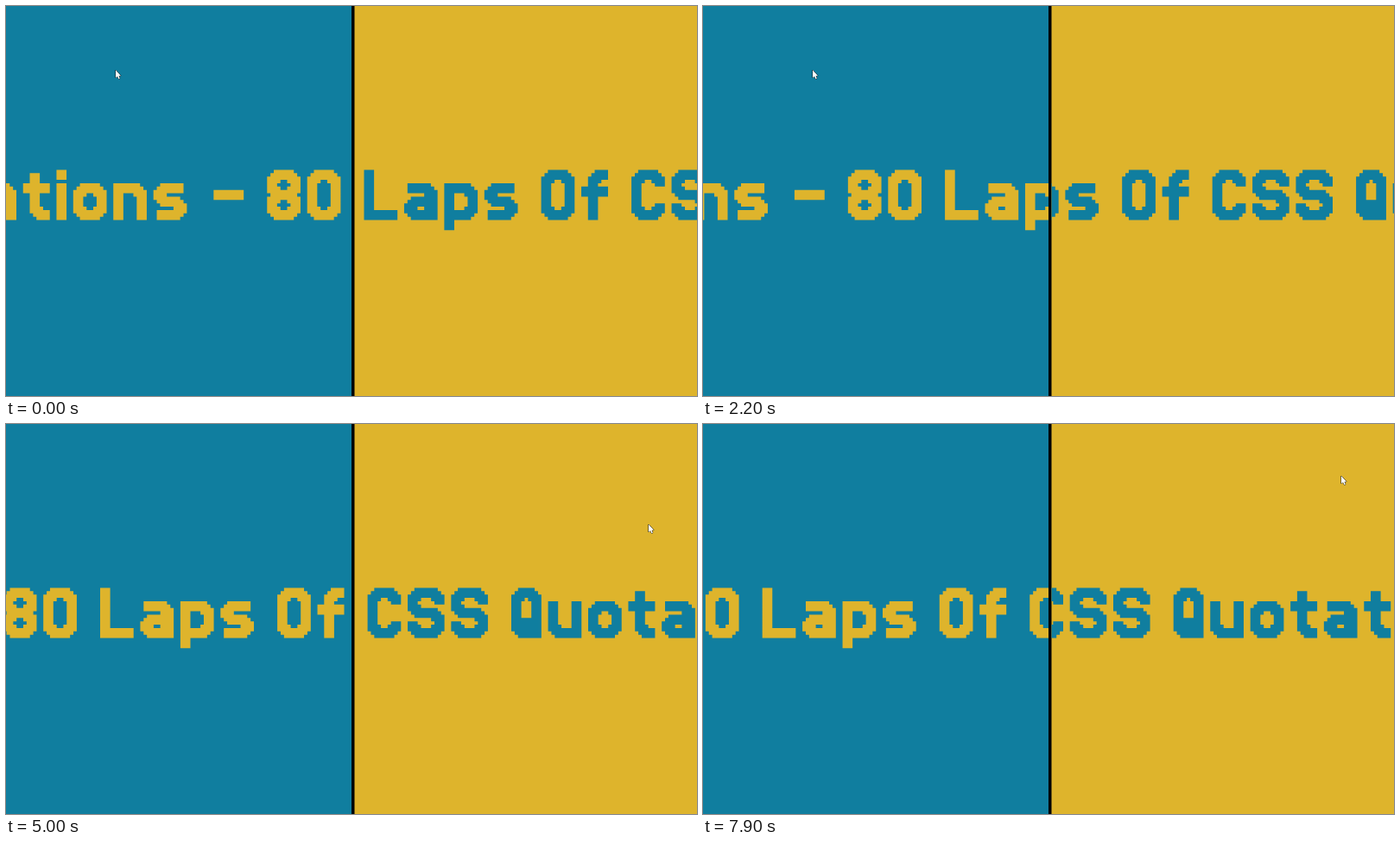
These frames come from a looping animation (800x451 px, 8000 ms). An HTML page with a canvas:

```html
<!DOCTYPE html>
<html lang="en">
<head>
<meta charset="utf-8">
<title>80 Laps Of CSS Quotations</title>
<style>
  html, body { margin: 0; width: 100%; height: 100%; overflow: hidden; background: #000; }
  canvas { display: block; width: 100vw; height: 100vh; }
</style>
</head>
<body>
<canvas id="stage" width="800" height="451" role="img" aria-label="80 Laps Of CSS Quotations"></canvas>
<script>
const ctx = document.getElementById('stage').getContext('2d');
const TEAL = '#107e9f', GOLD = '#deb42c';
const W = 800, H = 451, LOOP = 8000, STEP = 100;
const CELL = 3.87, CAP_Y = 189.5;

// Guide lines of the pixel letters, at the centre of a 3x3 pen.
const CAP = 1, XH = 5, MID = 7, BASE = 13, DESC = 16;
const L = 1, R = 8, CUT = 2, GAP = 2, SPACE = 5;

// Strokes are lists of [x0, y0, x1, y1].
const slant = (x0, y0, x1, y1) => [[x0, y0, x1, y1]];
const stem = (x, y0, y1) => slant(x, y0, x, y1);
const bar = (y, x0, x1) => slant(x0, y, x1, y);

// Bar with both ends bent: down for dir 1, up for dir -1.
const cup = (y, dir, right = R) => [
  ...slant(L, y + CUT * dir, L + CUT, y),
  ...bar(y, L + CUT, right - CUT),
  ...slant(right - CUT, y, right, y + CUT * dir)
];
const ring = (top, base, right = R) => [
  ...cup(top, 1, right), ...cup(base, -1, right),
  ...stem(L, top + CUT, base - CUT), ...stem(right, top + CUT, base - CUT)
];
// Top bar that turns down into the right side.
const shoulder = (from, end) => [
  ...bar(XH, from, R - CUT), ...slant(R - CUT, XH, R, XH + CUT), ...stem(R, XH + CUT, end)
];
// Middle of an S.
const spine = (top, right) => {
  const mid = (top + BASE) / 2;
  return [
    ...stem(L, top + CUT, mid - CUT), ...slant(L, mid - CUT, L + CUT, mid),
    ...bar(mid, L + CUT, right - CUT), ...slant(right - CUT, mid, right, mid + CUT),
    ...stem(right, mid + CUT, BASE - CUT)
  ];
};

const oval = ring(CAP, BASE);
const GLYPHS = {
  O: oval,
  0: oval,
  8: [...ring(CAP, MID), ...ring(MID, BASE)],
  Q: [...ring(CAP, BASE, R - 1), ...slant(R - 4, BASE - 3, R - 1, BASE)],
  C: [...cup(CAP, 1), ...cup(BASE, -1), ...stem(L, CAP + CUT, BASE - CUT)],
  S: [...cup(CAP, 1, R + 1), ...cup(BASE, -1, R + 1), ...spine(CAP, R + 1)],
  L: [...stem(L, CAP, BASE), ...bar(BASE, L, R)],
  a: [...shoulder(L + 1, BASE), ...cup(BASE - 4, 1), ...bar(BASE - 4, L + CUT, R),
      ...cup(BASE, -1), ...bar(BASE, L + CUT, R)],
  f: [...stem(3, CAP + CUT, BASE), ...slant(3, CAP + CUT, 5, CAP), ...bar(CAP, 5, 6), ...bar(XH + 1, L, 6)],
  i: [...stem(L, CAP, CAP), ...stem(L, XH, BASE)],
  n: [...stem(L, XH, BASE), ...shoulder(L, BASE)],
  o: ring(XH, BASE),
  p: [...stem(L, XH, DESC), ...shoulder(L, BASE - CUT), ...bar(BASE, L, R - CUT), ...slant(R - CUT, BASE, R, BASE - CUT)],
  s: [...spine(XH, R), ...slant(L, XH + CUT, L + CUT, XH), ...bar(XH, L + CUT, R - 1),
      ...bar(BASE, L + 1, R - CUT), ...slant(R - CUT, BASE, R, BASE - CUT)],
  t: [...stem(3, CAP + 1, BASE - CUT), ...slant(3, BASE - CUT, 5, BASE), ...bar(BASE, 5, 6), ...bar(XH, L, 6)],
  u: [...stem(L, XH, BASE - CUT), ...slant(L, BASE - CUT, L + CUT, BASE), ...bar(BASE, L + CUT, R), ...stem(R, XH, BASE)],
  '-': bar(MID, L + 1, R)
};

const advance = c => GLYPHS[c] ? Math.max(...GLYPHS[c].map(s => Math.max(s[0], s[2]))) + 2 + GAP : SPACE;

function layOut(text) {
  const path = new Path2D();
  let left = 0;
  for (const c of text) {
    for (const [x0, y0, x1, y1] of GLYPHS[c] || []) {
      const n = Math.max(Math.abs(x1 - x0), Math.abs(y1 - y0));
      for (let k = 0; k <= n; k++) {
        const f = n ? k / n : 0;
        path.rect(left + Math.round(x0 + (x1 - x0) * f) - 1, Math.round(y0 + (y1 - y0) * f) - 1, 3, 3);
      }
    }
    left += advance(c);
  }
  return path;
}

const LEAD = 'Quotations - 80 ';
const line = layOut(LEAD + 'Laps Of CSS Quotations');
const leadWidth = [...LEAD].reduce((sum, c) => sum + advance(c), 0) * CELL;

// The line slides left at a steady speed, then turns back.
const TURN = 6780, SPEED = 0.0611;
const textX = t => 414.5 - SPEED * (TURN - Math.abs(TURN - t)) - leadWidth;

// Mouse way points: time, x, y
const WAY = [[3500, 127, 74], [4100, 473, 94], [4500, 744, 116],
             [5500, 744, 116], [5800, 741, 69], [6100, 739, 60]];

function mouseAt(t) {
  let [, x, y] = WAY[0];
  for (let i = 1; i < WAY.length; i++) {
    const [t0, x0, y0] = WAY[i - 1], [t1, x1, y1] = WAY[i];
    const f = Math.min(1, (t - t0) / (t1 - t0));
    if (f > 0) [x, y] = [x0 + (x1 - x0) * f, y0 + (y1 - y0) * f];
  }
  return [x, y];
}

const arrow = new Path2D('M0 0V9L2 7.2L3.4 10.4L4.8 9.8L3.5 6.7H6Z');

function half(x, w, back, ink, t) {
  ctx.save();
  ctx.beginPath();
  ctx.rect(x, 0, w, H);
  ctx.clip();
  ctx.fillStyle = back;
  ctx.fillRect(0, 0, W, H);
  ctx.translate(textX(t), CAP_Y);
  ctx.scale(CELL, CELL);
  ctx.fillStyle = ink;
  ctx.fill(line);
  ctx.restore();
}

function draw(t) {
  ctx.fillStyle = '#000';
  ctx.fillRect(0, 0, W, H);
  half(0, 400, TEAL, GOLD, t);
  half(403.5, W - 403.5, GOLD, TEAL, t);

  ctx.save();
  ctx.translate(...mouseAt(t));
  ctx.strokeStyle = '#111';
  ctx.stroke(arrow);
  ctx.fillStyle = '#fff';
  ctx.fill(arrow);
  ctx.restore();
}

const start = performance.now();
function tick() {
  const t = (performance.now() - start) % LOOP;
  draw(Math.floor(t / STEP) * STEP);
  requestAnimationFrame(tick);
}
tick();
</script>
</body>
</html>
```
